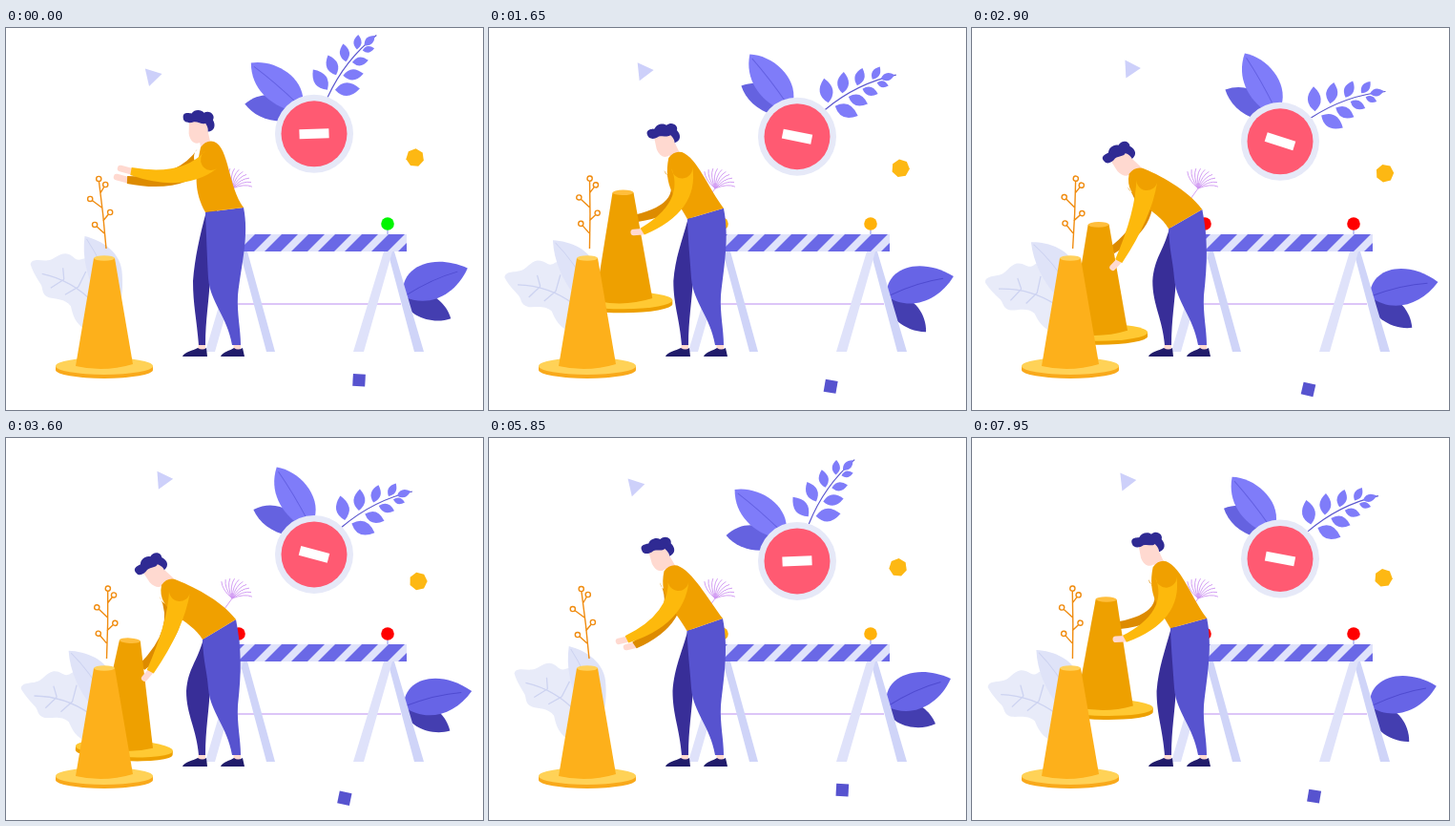
These frames come from a looping animation (500 by 400 pixels, 8000 ms). An HTML page:

```html
<!DOCTYPE html>
<html lang="en">
<head>
<meta charset="utf-8">
<title>Road works</title>
<style>
  html, body { margin: 0; width: 100%; height: 100%; overflow: hidden; background: #fff; }
  svg { display: block; width: 100vw; height: 100vh; }
  .hand { stroke: #ffd9d0; stroke-width: 6.5px; stroke-linecap: round; }
</style>
</head>
<body>
<svg viewBox="0 0 500 400">
  <defs>
    <clipPath id="board"><rect x="244" y="216" width="176" height="18"/></clipPath>
  </defs>

  <path id="triangle" d="M-6-9.500L10.500-1L-5 9.500Z" fill="#cdd0fa"/>
  <path id="nut" fill="#fdb813"/>
  <rect id="square" x="-6.500" y="-6.500" width="13" height="13" fill="#5753cf"/>

  <g id="sign">
    <g id="branch" fill="#7f7cf9"><path d="M17-37Q38-75 73-98" fill="none" stroke="#5c58cf" stroke-width="1.200"/></g>
    <path id="lowLeaf" d="M-74-28C-55-45-35-38-20-28L-30-12C-50-10-65-17-74-28Z" fill="#6562e0"/>
    <g id="highLeaf">
      <path d="M-63-77C-40-80-10-62-10-36L-22-25C-45-32-64-50-63-77Z" fill="#7f7cf9"/>
      <path d="M-60-73Q-38-55-16-32" fill="none" stroke="#6461e3"/>
    </g>
    <circle r="41" fill="#e6e9f8"/>
    <circle r="34.500" fill="#ff5a72"/>
    <rect id="bar" x="-15.500" y="-5" width="31" height="10" fill="#fff"/>
  </g>

  <g transform="translate(418 285)">
    <path id="darkLeaf" d="M0 0C8-22 38-18 52 0C36 14 8 14 0 0Z" fill="#443eb0"/>
  </g>
  <g transform="translate(417 281)">
    <g id="sideLeaf">
      <path d="M0 0C6-29 45-31 73 0C50 21 18 22 0 0Z" fill="#6764e6"/>
      <path d="M2 0Q35-5 62-1" fill="none" stroke="#4f4bd0"/>
    </g>
  </g>

  <path d="M243 289H414" stroke="#b98cf2" stroke-width="1.200"/>
  <path d="M245 234H253L282 339H273ZM400 234H407L438 339H428Z" fill="#cfd4f8"/>
  <path d="M240 234H249L219 339H209ZM396 234H405L375 339H364Z" fill="#dfe2fa"/>
  <path d="M244 210V216M400 210V216" stroke="#c3c7f5" stroke-width="2"/>
  <rect x="244" y="216" width="176" height="18" fill="#6a68e6"/>
  <g id="stripes" clip-path="url(#board)" fill="#e0e3fb"></g>
  <g id="lamps"><circle cx="244" cy="205" r="6.800"/><circle cx="400" cy="205" r="6.800"/></g>

  <g transform="translate(97 305)"><g id="foliage"><g transform="translate(-97 -305)">
    <path d="M26 247C28 240 38 244 44 243C50 243 55 236 63 236C72 237 72 245 80 242C88 238 100 250 110 262L118 300L82 315C72 308 70 300 68 291C62 283 52 284 45 282C36 278 40 272 36 267C32 260 29 256 26 247Z" fill="#e8ebf9"/>
    <path d="M38 257Q70 264 92 288M61 263L60 251M76 271L84 255M61 263L47 272M76 271L62 279" fill="none" stroke="#cdd3f1" stroke-width="1.300"/>
    <path d="M83 218C100 222 122 235 122 258C123 275 122 290 112 300L95 280C85 260 80 240 83 218Z" fill="#dfe3f8"/>
    <path d="M85 221Q101 245 110 275" fill="none" stroke="#cdd3f1"/>
  </g></g></g>
  <g transform="translate(105 235)">
    <g id="twig" fill="#fff" stroke="#f08c10" stroke-width="1.400"></g>
  </g>

  <path id="puff" fill="none" stroke="#cf95f2" stroke-width="0.900"/>
  <path id="backHand" class="hand"/><path id="backArm" fill="#dd8b00"/>
  <g id="heldCone"></g>
  <g id="restCone" transform="translate(103 354)"></g>

  <path d="M202 329H209L209 338H201ZM238 329H246L246 338H239Z" fill="#ffd9d0"/>
  <path d="M185 344C187 339 196 338 201 335Q206 338 210 335L211 344ZM225 344C227 339 235 338 239 335Q243 338 248 335L250 344Z" fill="#211c6b"/>
  <path id="backLeg" fill="#382e98"/>
  <path id="frontLeg" fill="#5753cf"/>
  <g id="head">
    <path d="M-10-1L-11 12C-10 21-5 24 0 22L1 29L12 28L9 10L11-1Z" fill="#ffd9d0"/>
    <path d="M-16-4C-17-12-9-9-7-9C-4-13 3-13 6-9C13-12 18-5 15-1C18 5 16 11 9 11C10 7 8 4 7 2C4 4 0 0-5 0C-10 2-16 0-16-4Z" fill="#2f2a93"/>
  </g>
  <path id="torso" fill="#f0a000"/>
  <path id="frontHand" class="hand"/><path id="frontArm" fill="#fdb90c"/>
</svg>
<script>
const LOOP = 8000, CYCLE = 6350;
const $ = id => document.getElementById(id);
const put = (id, d) => $(id).setAttribute('d', d);
const add = (id, markup) => $(id).insertAdjacentHTML('beforeend', markup);
const move = (id, x, y, angle = 0) =>
  $(id).setAttribute('transform', `translate(${x} ${y}) rotate(${angle})`);

const wave = (t, peak, period = CYCLE) => Math.cos(2 * Math.PI * (t - peak) / period);
const ramp = (t, from, to) => Math.min(1, Math.max(0, (t - from) / (to - from)));
const easeOut = u => Math.sin(u * Math.PI / 2);
const mix = (a, b, u) => a.map((v, i) => v + (b[i] - v) * u);
const polar = ([x, y], angle, r) => [x + r * Math.cos(angle), y + r * Math.sin(angle)];
const rad = degrees => degrees * Math.PI / 180;

// Swinging parts: middle angle, swing, time of the peak
const SWING = {
  branch: [10.8, 18, 2600], highLeaf: [7.5, 10, 3050], lowLeaf: [11.5, 13, 2350], bar: [7.5, 10, 2850],
  sideLeaf: [-17.8, 6, 3050], darkLeaf: [26, 14, 1900], foliage: [-7, -7.5, 2700], twig: [4.3, 4.5, 2750],
};

// Carried cone: time, x, y, tilt
const CARRY = [
  [500, 103, 354, 0], [1100, 108, 240, 18], [2200, 155, 304, -8], [3600, 124, 325, 3], [4400, 103, 354, 0],
];
function conePose(t) {
  let pose = CARRY[0].slice(1);
  CARRY.slice(1).forEach(([end, ...next], i) => {
    pose = mix(pose, next, easeOut(ramp(t, CARRY[i][0], end)));
  });
  return pose;
}
const onCone = ([x, y, tilt], gx, gy) => {
  const c = Math.cos(rad(tilt)), s = Math.sin(rad(tilt));
  return [x + gx * c - gy * s, y + gx * s + gy * c];
};

// Two-bone arm with a tapered sleeve
function drawArm(side, shoulder, target, bend) {
  const upper = 39, lower = 52;
  const dx = target[0] - shoulder[0], dy = target[1] - shoulder[1];
  const d = Math.min(Math.hypot(dx, dy), upper + lower - 1), aim = Math.atan2(dy, dx);
  const lift = Math.acos((upper ** 2 + d ** 2 - lower ** 2) / (2 * upper * d));
  const elbow = polar(shoulder, aim - lift, upper), wrist = polar(shoulder, aim, d);
  const fore = Math.atan2(wrist[1] - elbow[1], wrist[0] - elbow[0]);
  const control = mix(elbow, mix(shoulder, wrist, 0.5), -0.35);
  const edge = k => [
    polar(shoulder, aim - lift + Math.PI / 2, 11 * k),
    polar(control, aim + Math.PI / 2, 9 * k),
    polar(wrist, fore + Math.PI / 2, 4 * k),
  ];
  const [a, b, c] = edge(1), [p, q, r] = edge(-1);
  put(side + 'Arm', `M${a}Q${b} ${c}L${r}Q${q} ${p}A11 11 0 0 1 ${a}Z`);
  put(side + 'Hand', `M${wrist}l${-11 + 5 * bend} ${-3 + 10 * bend}`);
}

function drawMan(t, cone) {
  const bend = easeOut(ramp(t, 1100, 3300)) - ramp(t, 4650, CYCLE) ** 2;
  const pose = (upright, bent) => mix(upright, bent, bend);
  const neck = pose([212, 121], [171, 150]), [nx, ny] = neck;
  const [fx, fy] = pose([209, 193], [206, 211]);
  const [rx, ry] = pose([249, 188], [241, 190]);
  const [knee] = pose([196], [189]);

  put('torso', `M${nx + 6} ${ny - 2}C${nx + 22} ${ny + 4} ${rx - 16} ${ry - 21} ${rx} ${ry}`
    + `L${fx} ${fy}C${fx - 12} ${fy - 22} ${nx - 14} ${ny + 33} ${nx - 8} ${ny + 4}Q${nx - 2} ${ny - 4} ${nx + 6} ${ny - 2}Z`);
  put('backLeg', `M${fx + 1} ${fy - 1}C${fx - 6} ${fy + 25} ${knee + 2} 240 ${knee} 265`
    + `C${knee} 290 200 305 202 332H209C209 305 213 285 214 260L220 225L${fx + 12} ${fy - 2}Z`);
  put('frontLeg', `M${fx} ${fy}L${rx} ${ry}C${rx + 6} ${ry + 30} 247 245 243 280`
    + `C242 300 246 315 246 332H237C232 302 214 287 212 262C211 245 ${fx + 1} ${fy + 25} ${fx} ${fy}Z`);
  move('head', ...pose([202, 98, -3], [152, 135, -38]));

  const grip = ramp(t, 500, 1000) - ramp(t, 3700, 4300);
  const drop = Math.sqrt(Math.max(0, bend));
  const reach = (raised, lowered, gx, gy) =>
    mix(mix(raised, lowered, drop), onCone(cone, gx, gy), grip);
  drawArm('front', [nx + 3 + 8 * bend, ny + 17 - 7 * bend], reach([131, 150], [150, 236], 20, -72), bend);
  drawArm('back', [nx - 4 + 5 * bend, ny + 14], reach([127, 159], [163, 241], 14, -86), bend);
}

function buildBranch() {
  const stem = u => mix(mix([17, -37], [38, -75], u), mix([38, -75], [73, -98], u), u);
  const leaflet = (u, spread, length) => {
    const [x, y] = stem(u), [x2, y2] = stem(u + 0.01);
    const angle = Math.atan2(y2 - y, x2 - x) + rad(spread);
    const base = polar([x, y], angle, spread ? 4 : 0), middle = polar(base, angle, length * 0.45);
    const side = s => polar(middle, angle + s * Math.PI / 2, length * 0.53);
    add('branch', `<path d="M${base}Q${side(1)} ${polar(base, angle, length)}Q${side(-1)} ${base}Z"/>`);
  };
  for (let i = 0; i < 4; i++) {
    leaflet(0.06 + 0.2 * i, 8 * i - 62, 26 - 3.5 * i);
    leaflet(0.1 + 0.2 * i, 60 - 8 * i, 26 - 4.5 * i);
  }
  leaflet(0.8, 0, 15);
}

function buildTwig() {
  const tips = [[-8, -77], [-1, -71], [-17, -56], [4, -42], [-12, -29]];
  const stem = 'M0-4Q-3-40-8-76' + tips.slice(1).map(([x, y]) => `M${x} ${y}L${(y + 8) / 10} ${y + 9}`).join('');
  add('twig', `<path d="${stem}" fill="none"/>`
    + tips.map(([x, y]) => `<circle cx="${x}" cy="${y}" r="2.600"/>`).join(''));
}

function build() {
  buildBranch();
  buildTwig();
  for (let x = 232; x < 420; x += 28) add('stripes', `<path d="M${x} 234l18-18h11l-18 18Z"/>`);

  const heart = [237, 168];
  let rays = `M229 179L${heart}`;
  for (let i = 0; i < 10; i++) {
    const a = rad(-122 + i * 13);
    rays += `M${heart}Q${polar(heart, a - 0.3, 14)} ${polar(heart, a, 21)}`;
  }
  put('puff', rays);

  const coneArt = (body, top, plate, rim) => `
    <path d="M-51 0V4A51 9 0 0 0 51 4V0Z" fill="${rim}"/>
    <ellipse rx="51" ry="9" fill="${plate}"/>
    <path d="M-11-113H11L30-2Q0 7-30 0Z" fill="${body}"/>
    <ellipse cy="-113" rx="11" ry="2.800" fill="${top}"/>`;
  add('heldCone', coneArt('#eea000', '#ffbe3c', '#ffc933', '#eda000'));
  add('restCone', coneArt('#fdb01b', '#ffd15c', '#ffd257', '#f9a91b'));

  put('nut', 'M' + Array.from({ length: 7 }, (_, i) => polar([0, 0], i * Math.PI / 3.5, 9.5)).join('L') + 'Z');
}

function draw(t) {
  const drift = wave(t, -320);
  move('triangle', 159.7 - 6.7 * drift, 47 + 4 * drift, -5 - 5 * drift);
  move('square', 361.5 + 9 * drift, 373.5 - 5 * drift, 8 - 5 * drift);
  move('nut', 430.7 - 2 * drift, 143.8 - 8.4 * drift, 8 + 10 * drift);
  move('sign', 323, 120 - 9.2 * wave(t, 0, 2 * CYCLE));
  for (const [id, [middle, swing, peak]] of Object.entries(SWING))
    move(id, 0, 0, middle + swing * wave(t, peak));

  const light = Math.floor(t / (CYCLE * 2 / 9)) % 3;
  $('lamps').setAttribute('fill', ['#00f500', '#ffb20a', '#ff0000'][light]);

  const action = t % CYCLE, cone = conePose(action);
  $('heldCone').style.display = cone[1] < 353 ? '' : 'none';
  move('heldCone', ...cone);
  drawMan(action, cone);
}

build();
const start = performance.now();
function tick() {
  draw((performance.now() - start) % LOOP);
  requestAnimationFrame(tick);
}
tick();
</script>
</body>
</html>
```
